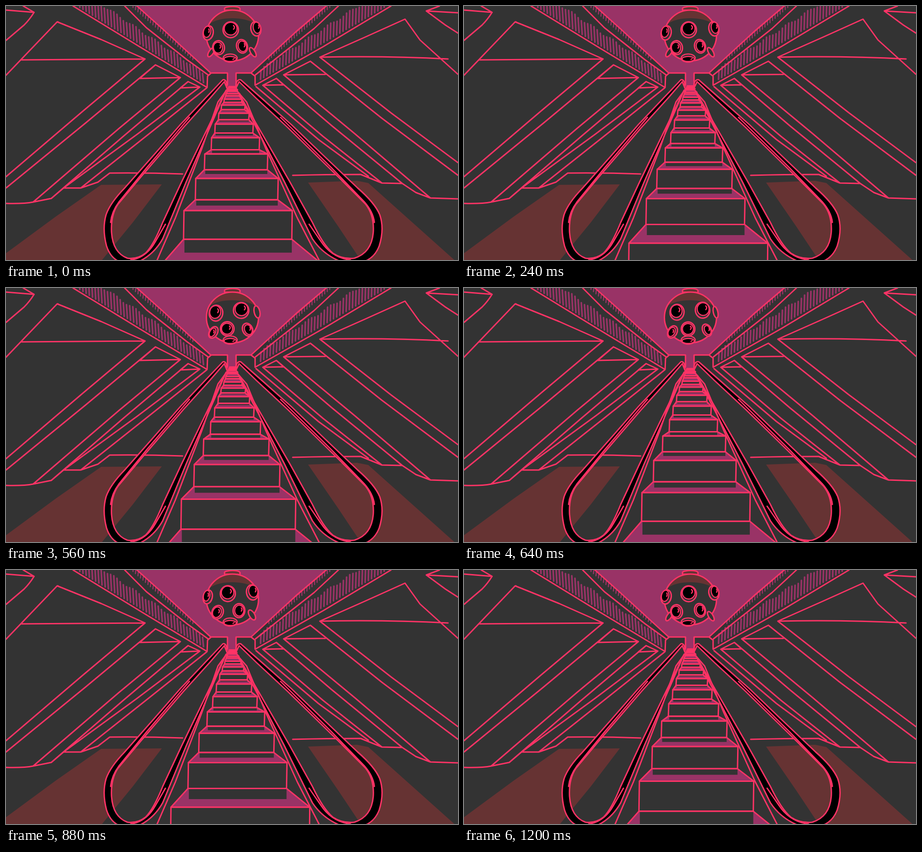
An HTML page with a canvas that plays this animation: 998x561 px, repeating every 1280 ms.

```html
<!DOCTYPE html>
<html>
<head>
<meta charset="utf-8">
<title>Escalator</title>
<style>
html, body { margin: 0; width: 100%; height: 100%; overflow: hidden; background: #333; }
canvas { display: block; }
</style>
</head>
<body>
<canvas id="stage" width="998" height="561"></canvas>
<script>
const g = document.getElementById('stage').getContext('2d');
const GREY = '#333333', RED = '#ff3366', PURPLE = '#993366', BROWN = '#663333', BLACK = '#000';
g.lineCap = g.lineJoin = 'round';

function fill(path, color) {
  g.fillStyle = color;
  g.fill(path);
}
function line(path, color = RED, width = 3) {
  g.strokeStyle = color;
  g.lineWidth = width;
  g.stroke(path);
}
const P = d => new Path2D(d);
function oval(x, y, rx, ry, tilt = 0) {
  const p = new Path2D();
  p.ellipse(x, y, rx, ry, tilt, 0, 7);
  return p;
}
// Linear lookup in rows of [key, ...values]
function lookup(rows, u) {
  let i = 1;
  while (i < rows.length - 1 && rows[i][0] < u) i++;
  const a = rows[i - 1], b = rows[i], f = (u - a[0]) / (b[0] - a[0]);
  return a.slice(1).map((v, j) => v + (b[j + 1] - v) * f);
}

const ceiling = P('M289 0L452 148H489V178H508V148H541L707 0Z');
const ceilingEdges = P(`M289 0L345 50L452 148H489V174M707 0L640 57L541 148H508V174
  M262 0L310 48L400 119L446 152M734 0L680 50L600 113L551 152
  M148 0L300 93L444 180L445 155L453 148M850 0L700 90L550 175V155L541 148`);

const walls = P(`M0 9L62 14L38 0M62 14Q52 30 40 42L0 76
  M0 153L113 35L210 74L307 117L33 119M113 35L115 35
  M307 117L170 232L0 377M330 130L175 259L0 402
  M295 160L330 130L385 158ZM385 158L250 270L60 433
  M385 181L402 167L428 179ZM402 167L260 287L100 425
  M428 179L290 283L127 402M443 181L310 287L165 402
  M0 436Q40 437 60 433L100 425L127 402H165L203 389L229 369Q310 368 390 371
  M998 15L928 11L957 0M928 11L970 42L998 60
  M998 151L914 75L881 29L790 70L693 113Q840 110 976 117
  M693 113L850 236L998 346M672 122L830 248L998 374
  M672 122L613 152L705 151M613 152L770 282L937 424
  M567 175L597 160L613 174ZM597 160L720 265L875 392
  M567 175L700 288L830 391M552 178L690 295L800 376
  M998 426L937 424L905 412L875 392L830 391L783 372Q710 372 633 374`);

const floors = P(`M210 395L344 394L280 478L212 561H0V546L110 465Z
  M667 390L775 386L800 391L990 561H783L735 489Z`);

// Handrails: the right one is the left one flipped and slightly stretched
const rail = {
  band: P(`M488 182Q488 161 479 163L437 207L385 262L330 325L262 402Q230 435 221 461
    Q212 492 222 530Q232 561 258 567L290 566Q326 550 346 514L398 388L486 186
    L388 388L346 478Q326 528 308 546Q290 560 268 557Q236 545 233 500Q231 462 247 438
    L300 375L392 268L450 204L482 167Z`),
  lines: P(`M332 565L374 468L432 316L468 212L490 182M231 478Q233 455 250 432L310 358L405 246
    M275 561Q310 556 330 520L352 482`)
};
function flipped(path) {
  const p = new Path2D();
  p.addPath(path, new DOMMatrix([-1.19, 0, 0, 1, 1088.2, 0]));
  return p;
}
const rails = [rail, { band: flipped(rail.band), lines: flipped(rail.lines) }];

function drawHall() {
  g.fillStyle = GREY;
  g.fillRect(0, 0, 998, 561);
  fill(floors, BROWN);
  fill(ceiling, PURPLE);

  const bars = new Path2D(), ticks = new Path2D();
  for (let i = 0; i < 40; i++) {
    const wob = Math.sin(i * 5.3) * 3;
    const lx = 163 + i * 7, ly = (lx - 148) * 0.608 - 6;
    const rx = 835 - i * 7, ry = (850 - rx) * 0.583 - 6;
    const len = 39 - i * 0.43 + wob;
    bars.moveTo(lx, ly);
    bars.lineTo(lx - 2, ly - len);
    bars.moveTo(rx, ry);
    bars.lineTo(rx + 1, ry - len);
  }
  for (let y = -12; y < 118; y += 5) {
    const len = 10 - y * 0.04;
    ticks.moveTo(289 + y * 1.1, y);
    ticks.lineTo(288 + y * 1.1, y + len);
    ticks.moveTo(707 - y * 1.12, y);
    ticks.lineTo(707 - y * 1.12, y + len);
  }
  line(bars, PURPLE, 3.6);
  line(ticks, PURPLE, 2.5);
  line(ceilingEdges);
  line(walls);
}

// Lens tracks over the ball: [step, x, y, half width]
const upper = [[-3, 443, 58, 2], [-1, 443, 57, 7], [0, 444, 57, 8], [1, 452, 55, 10],
  [3, 462, 53, 12], [5, 476, 49, 13], [8, 496, 50, 14], [11, 520, 47, 14],
  [13, 536, 46, 12], [15, 546, 47, 10], [16, 554, 48, 8], [17, 554, 49, 6], [20, 558, 51, 2]];
const lower = [[0, 451, 102, 2], [1, 453, 101, 4], [3, 456, 98, 6], [5, 461, 96, 8],
  [8, 468, 92, 10], [11, 488, 90, 12], [13, 501, 91, 12], [16, 522, 89, 9],
  [19, 535, 92, 8], [21, 541, 94, 5], [24, 547, 102, 2]];

function drawLens(track, u, maxH, drop) {
  if (u < track[0][0] || u > track[track.length - 1][0]) return;
  const [x, y, w] = lookup(track, u);
  const h = Math.min(maxH, maxH * 0.6 + w * 0.5);
  const side = (500 - x) / 58;
  const tilt = (drop ? -1 : 1) * side * 0.22 + (drop ? 0 : -side * 0.9 * (w < 9.5));
  const ring = oval(x + side * 2.5, y + drop, w + 3, h + 3.5, drop ? -tilt : -tilt);
  fill(ring, GREY);
  line(ring, RED, 3);
  if (w < 3.5) return;
  const glass = oval(x, y, w, h, -tilt);
  fill(glass, BLACK);
  line(glass, RED, 2.4);
  const gx = x + w * 0.45;
  line(P(`M${gx} ${y - h * 0.5}q${w * 0.3} ${h * 0.3} 0 ${h * 0.6}`), RED, 2.6);
}

function drawBall(turn) {
  const ball = oval(500, 65, 57.5, 56);
  const knob = P('M483 9Q480 3 490 2Q500 0 511 2Q519 4 516 10Z');
  fill(knob, BROWN);
  line(knob);
  fill(ball, GREY);
  fill(P('M448 40Q462 9 500 9Q538 9 550 39Q530 27 500 27Q468 27 448 40Z'), BROWN);
  line(ball);
  for (let i = -1; i < 4; i++) {
    drawLens(lower, turn + 8 * i, 12, 0);
    drawLens(upper, turn + 8 * i, 14, 2.5);
  }
  const base = oval(495, 115, 15.5, 9), glass = oval(495, 117, 13.5, 5.5);
  fill(base, GREY);
  line(base, RED, 2.6);
  fill(glass, BLACK);
  line(glass, RED, 2.4);
  line(P('M501 118L504 116'), RED, 2.4);
}

// Step edge by distance: [step, y, left, right]
const stairs = [[-11, 174, 494, 506], [-10, 178, 492, 508], [-9, 185, 490, 511],
  [-8, 194, 486, 516], [-7, 206, 482, 521], [-6, 219, 476, 528], [-5, 237, 470, 537],
  [-4, 261, 462, 546], [-3, 291, 454, 560], [-2, 327, 439, 578], [-1, 381, 419, 601],
  [0, 452, 393, 632], [1, 567, 347, 694], [2, 720, 285, 780]];

function drawStairs(phase) {
  for (let i = -10; i < 2; i++) {
    const s = i - phase;
    const [y, l, r] = lookup(stairs, s), [ny, nl, nr] = lookup(stairs, s + 1);
    const depth = y - 175;
    const base = y + Math.max(3, depth * 0.228);
    const shade = 0.29 + 0.045 * Math.min(1, Math.max(0, (s + 0.8) / 0.6));
    const low = Math.min(ny, y + depth * shade);
    const front = P(`M${l} ${y}H${r}L${r - 1} ${base}H${l - 1}Z`);
    const tread = P(`M${l - 1} ${base}H${r - 1}L${nr} ${ny}H${nl}Z`);
    fill(tread, PURPLE);
    if (low > base) fill(P(`M${l + 1} ${base}H${r - 1}V${low}H${l + 1}Z`), GREY);
    fill(front, GREY);
    line(tread);
    line(front);
  }
}

function draw() {
  const frame = Math.floor(performance.now() % 1280 / 80);
  drawHall();
  drawBall(Math.min(8, Math.max(0, frame - 4)));
  for (const { band, lines } of rails) {
    fill(band, BLACK);
    line(band);
    line(lines);
  }
  drawStairs(frame % 8 / 8);
  requestAnimationFrame(draw);
}
draw();
</script>
</body>
</html>
```
